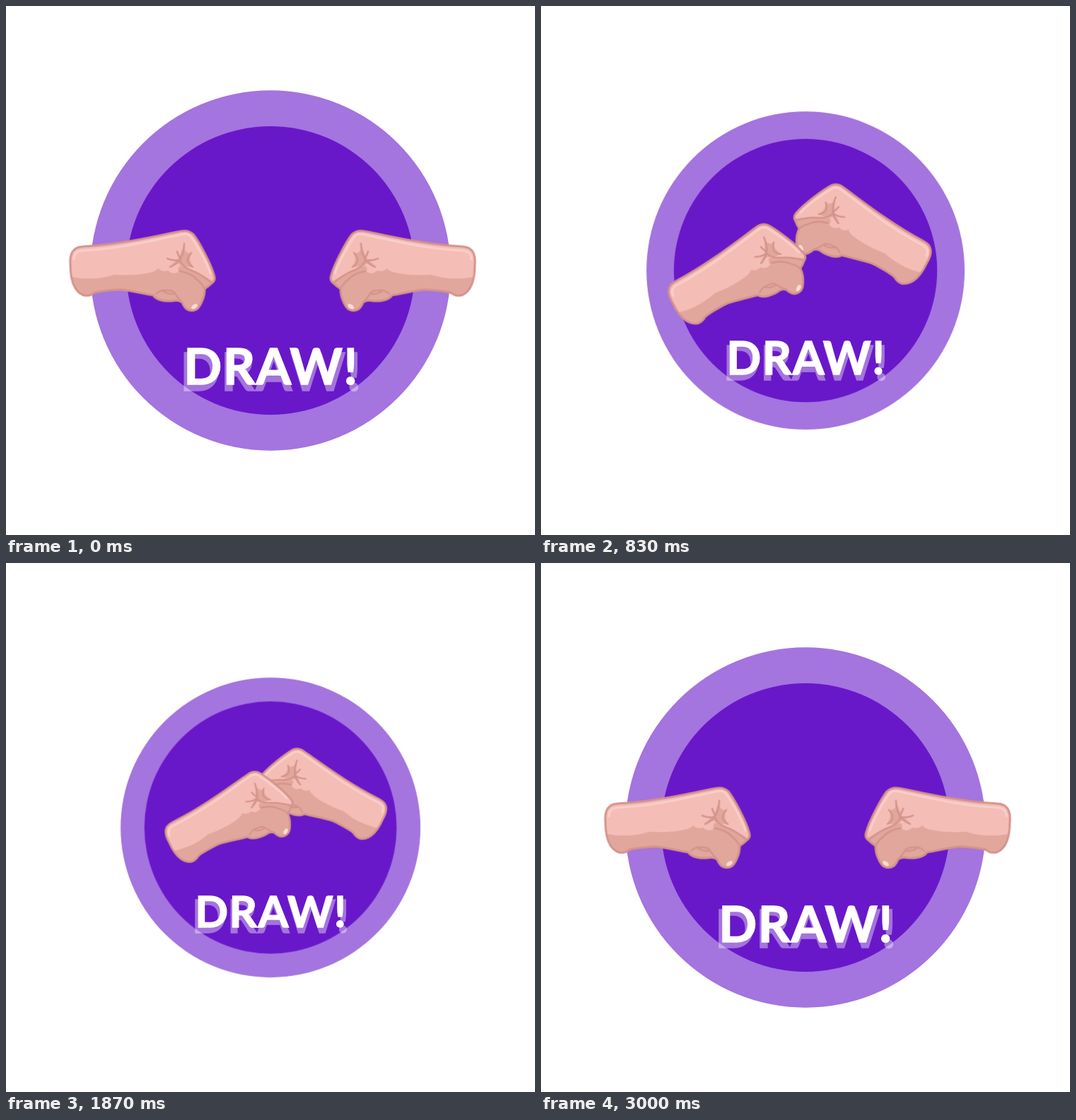
These frames come from a looping animation (748 by 748 pixels, 3.03 s). An HTML page:

```html
<!DOCTYPE html>
<html lang="en">
<head>
<meta charset="utf-8">
<title>Draw!</title>
<style>
  html, body { margin: 0; width: 100%; height: 100%; overflow: hidden; background: #fff; }
  svg { display: block; width: 100vw; height: 100vh; }

  .pulse {
    transform-origin: 374px 374px;
    animation: pulse 3030ms cubic-bezier(.365, 0, .635, 1) infinite;
  }
  .ring { --min: .802; fill: #a474df; }
  .disc { --min: .8515; fill: #6818c9; }
  .label {
    --min: .846;
    transform-origin: 374px 380px;
    font: 700 71px Lato, "Open Sans", sans-serif;
    letter-spacing: .021em;
    text-anchor: middle;
    fill: #fff;
    stroke: #fff;
    stroke-width: 1.5;
  }
  .label .shade { font-size: 74px; opacity: .4; }

  .hand { animation: 3030ms cubic-bezier(.35, 0, .65, 1) infinite; }
  .left { animation-name: left; }
  .right { animation-name: right; }

  @keyframes pulse {
    0%, 98.35%, 100% { transform: scale(1); }
    49.17% { transform: scale(var(--min)); }
  }
  /* reach in, left fist pulls back, bumps, holds, both return */
  @keyframes left {
    0%, 99.01%, 100% { transform: translate(203.6px, 378.2px) rotate(0deg) scale(1, 1); }
    16.5% { transform: translate(316px, 363px) rotate(-25.5deg) scale(1, 1); }
    27.39% { transform: translate(289.8px, 383.6px) rotate(-25deg) scale(.97, .97); }
    40.59%, 74.26% { transform: translate(327px, 363.7px) rotate(-23.5deg) scale(.897, .897); }
  }
  @keyframes right {
    0%, 99.01%, 100% { transform: translate(550.4px, 378.2px) rotate(0deg) scale(-1, 1); }
    16.5% { transform: translate(450px, 331px) rotate(24.5deg) scale(-1, 1); }
    27.39% { transform: translate(442px, 327.2px) rotate(25deg) scale(-.97, .97); }
    40.59%, 74.26% { transform: translate(436.3px, 331.2px) rotate(23.5deg) scale(-.897, .897); }
  }
</style>
</head>
<body>
<svg viewBox="0 0 748 748">
  <defs>
    <path id="shape" d="M91 366C90 355 92 348 97 344Q101 340.5 111 340C165 337 213 325 247 318.5Q258 316 265 323C273 333 290 365 294 380Q297 388 291 392Q286 397 281 400C281 407 280 412 277 418Q273 427 269 429Q262 432.500 256 429Q252 426 249 419Q243 415 236 417Q222 418 214 414Q210 412 208 409C195 407 175 402 161 401C145 402 130 403 124 406Q119 410 112 409.500Q104 408 98 399Q91 388 91 366Z"/>
    <clipPath id="inside"><use href="#shape"/></clipPath>
    <g id="fist" transform="translate(-203.6 -378.2)" stroke-linecap="round" stroke-linejoin="round">
      <use href="#shape" fill="#f4bdb6"/>
      <g clip-path="url(#inside)">
        <path fill="#e1a79c" d="M88 382Q122 390 153 380Q182 382 204 377Q212 375 215 371Q221 377 229 374Q236 381 244 376Q242 370 247 367Q258 373 268 377Q282 382 298 393L298 440H88Z"/>
        <path fill="#e1a79c" d="M251 338Q252 350 262 350Q257 360 265 369Q252 370 243 364Q235 365 231 368Q238 362 243 358Q248 350 251 338Z"/>
        <path fill="none" stroke="#f9cfca" stroke-width="3" d="M96 358Q96 347 107 346C165 343 214 330 249 323Q258 321 262 327C270 338 284 362 289 378"/>
      </g>
      <g fill="none" stroke="#d4938b" stroke-width="2.400">
        <path d="M252 336Q252 348 246 359Q240 366 232 369M228 357Q237 361 246 359M242 347Q244 354 247 357M262 349Q256 356 257 361Q260 367 264 369M246 359Q248 368 260 373Q275 378 290 391"/>
        <path d="M246 375Q263 378 270 387Q277 392 281 400M212 407Q219 401 226 402Q235 402 238 405Q243 413 249 419M222 403Q229 408 237 407"/>
      </g>
      <ellipse cx="266.500" cy="425" rx="5" ry="3" transform="rotate(-38 266.500 425)" fill="#fbdcd4"/>
      <use href="#shape" fill="none" stroke="#d4938b" stroke-width="3"/>
    </g>
  </defs>

  <circle class="pulse ring" cx="374" cy="374" r="254.700"/>
  <circle class="pulse disc" cx="374" cy="374" r="204"/>
  <g class="hand right"><use href="#fist"/></g>
  <g class="hand left"><use href="#fist"/></g>
  <g class="pulse label">
    <text class="shade" x="375" y="544">DRAW!</text>
    <text x="375" y="535.500">DRAW!</text>
  </g>
</svg>
</body>
</html>
```
